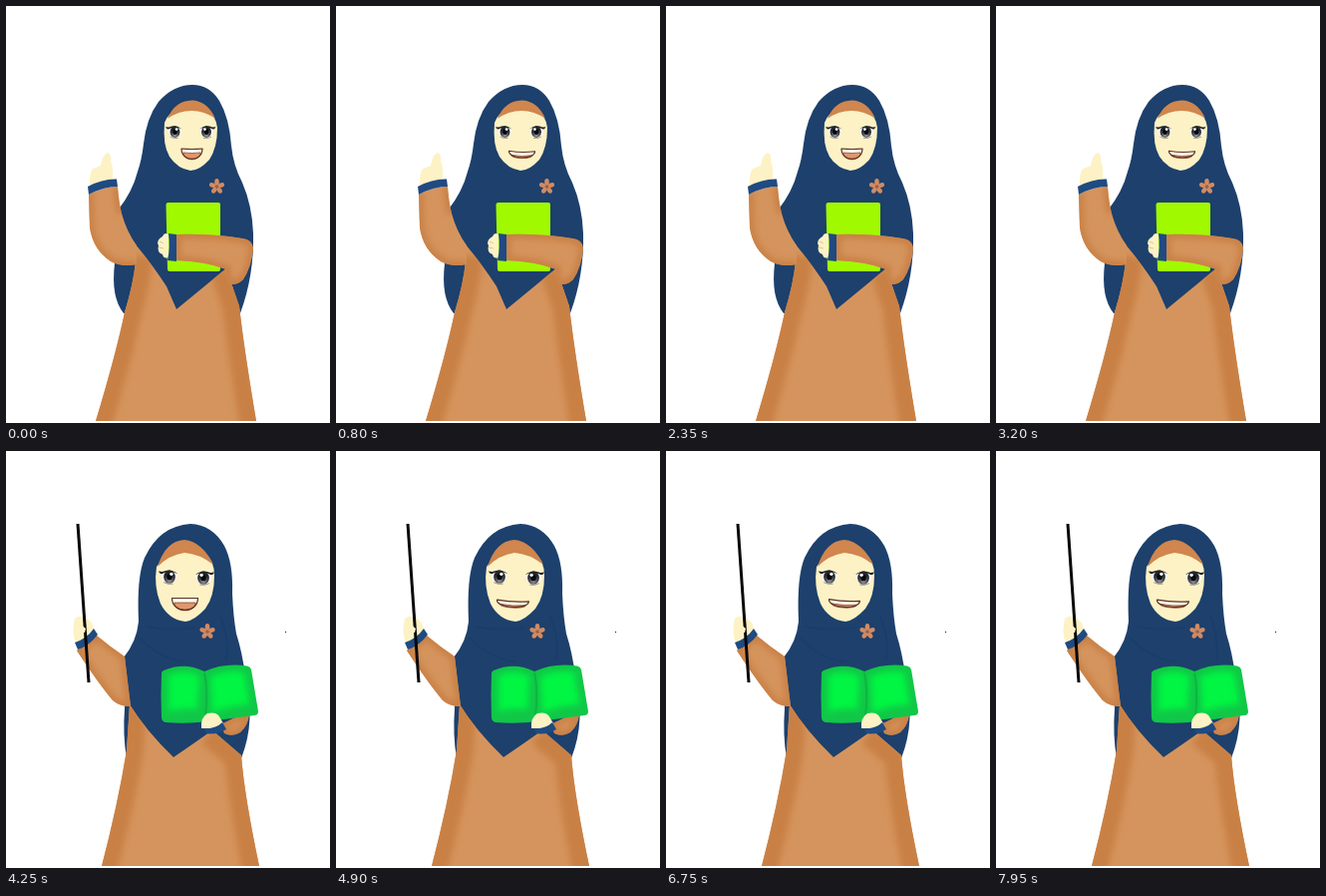
These frames come from a looping animation (325 by 418 pixels, 8000 ms). An HTML page:

```html
<!DOCTYPE html>
<html lang="en">
<head>
<meta charset="utf-8">
<title>Teacher</title>
<style>
  html, body { margin: 0; width: 100%; height: 100%; overflow: hidden; background: #fff; }
  svg { display: block; width: 100%; height: 100%; }
  .veil { fill: #1d406c; }
  .cuff { fill: #1f4a82; }
  .skin { fill: #fdf2c5; }
  .cloth { fill: #d5945d; }
  .shade { fill: none; stroke: #c98044; stroke-width: 9; filter: url(#soft); }
  .side { stroke-width: 34; }
  .fold { fill: none; stroke: #173a6a; stroke-width: 1.5; opacity: .5; }
  .cap { fill: #d0864e; }
</style>
</head>
<body>
<svg viewBox="0 0 325 418" preserveAspectRatio="none">
  <defs>
    <filter id="soft" x="-40%" y="-40%" width="180%" height="180%"><feGaussianBlur stdDeviation="3"/></filter>
    <radialGradient id="iris" cy=".75">
      <stop offset="0" stop-color="#9fa1a8"/><stop offset=".55" stop-color="#555862"/><stop offset="1" stop-color="#24262d"/>
    </radialGradient>
    <g id="eye">
      <path d="M-7-2Q0-8 7-3Q7 5 1 6.5Q-5 6-7-2" fill="#fff"/>
      <ellipse cy=".2" rx="4.9" ry="5.9" fill="url(#iris)"/>
      <ellipse rx="2.4" ry="3" fill="#08090c"/>
      <circle cx="-1.6" cy="-2.4" r="1.4" fill="#fff"/>
      <path d="M-7-2.5Q-1-8 6-4.5L9.5-4.8L8-2.8L6.5-2.5Q0-6.5-7-2.5" fill="#222226"/>
      <path d="M-3 6.4Q1 7.4 5 5" fill="none" stroke="#776f66" stroke-width=".6"/>
    </g>
    <g id="flower" fill="#d18a62">
      <g id="petal"><ellipse cy="-4.5" rx="2.3" ry="3.4"/></g>
      <use href="#petal" transform="rotate(72)"/><use href="#petal" transform="rotate(144)"/>
      <use href="#petal" transform="rotate(216)"/><use href="#petal" transform="rotate(288)"/>
      <circle r="1.6" fill="#a6603e"/>
    </g>

    <path id="dressA" d="M122 231L130 239Q148 261 161 281L171 304L221 263L234 301Q239 345 251 416H90Q110 350 119 307Q128 278 130 255Z"/>
    <path id="raisedA" d="M83 189Q98 181 112 181Q113 196 116 208Q121 226 131 240L131 259Q116 262 105 256Q87 244 84 222Z"/>
    <path id="foldedA" d="M171 229Q205 228 237 233Q247 234 248 243Q246 262 238 274Q231 281 224 278Q219 272 221 264Q200 256 171 255Z"/>
    <path id="dressB" d="M124 254Q140 280 168 307Q190 292 207 280L236 305Q239 345 254 416H96Q112 355 121 300Z"/>
    <path id="raisedB" d="M71 200L91 185Q104 196 119 206L125 256Q114 256 107 250Q92 232 71 200Z"/>
    <path id="foldedB" d="M216 274L236 264L244 263Q243 275 235 282Q227 287 219 283Z"/>
    <clipPath id="cDressA"><use href="#dressA"/></clipPath>
    <clipPath id="cRaisedA"><use href="#raisedA"/></clipPath>
    <clipPath id="cFoldedA"><use href="#foldedA"/></clipPath>
    <clipPath id="cDressB"><use href="#dressB"/></clipPath>
    <clipPath id="cRaisedB"><use href="#raisedB"/></clipPath>
    <clipPath id="cFoldedB"><use href="#foldedB"/></clipPath>
  </defs>

  <g id="sceneA">
    <path class="veil" d="M187 79Q204 79 214 95Q224 112 226 140Q228 160 237 177Q247 200 248 228Q249 270 235 308H118Q105 292 109 258L112 205Q127 186 132 166Q136 155 138 138Q141 112 153 96Q168 79 187 79Z"/>
    <use href="#dressA" class="cloth"/>
    <g clip-path="url(#cDressA)"><path class="shade side" d="M130 250Q128 278 119 307Q110 350 84 436M221 263L234 301Q239 345 254 436"/></g>
    <use href="#raisedA" class="cloth"/>
    <g clip-path="url(#cRaisedA)"><path class="shade" d="M112 181Q113 196 116 208M83 186L84 222Q87 244 105 256Q116 262 131 259"/></g>
    <path class="skin" d="M84 181Q83 168 87 163L95 160Q97 148 102 147Q106 148 105 155Q109 166 106 176L98 181Z"/>
    <path class="cuff" d="M82 181Q97 173 111 173.5L112 181Q98 181 83 189Z"/>
    <path d="M163 197H213Q215 197 215 199V264Q215 266 213 266H164Q162 266 162 264L160.500 199Q160.500 197 163 197Z" fill="#a1f900"/>
    <use href="#foldedA" class="cloth"/>
    <g clip-path="url(#cFoldedA)"><use href="#foldedA" class="shade"/></g>
    <path class="skin" d="M163 229Q159 226 157 231Q150 235 153 240Q151 247 157 249Q158 254 163 252Z"/>
    <path d="M154 236L158 238M153 242L158 243" stroke="#ddc797" fill="none"/>
    <path class="cuff" d="M163 228L171 229V256L162 255Q165 242 163 228Z"/>
    <path class="skin" d="M159 117Q163 106 174 103Q187 98 200 103Q210 108 212 122Q212 142 204 154Q194 165 185 165Q172 163 164 151Q157 139 159 117Z"/>
    <path class="cap" d="M162 113Q169 95 187 94.500Q203 96 210 113Q199 105 186 105Q173 105 162 113Z"/>
    <use href="#flower" transform="translate(211.500 181)"/>
    <g class="eyes" data-y="126">
      <use href="#eye" transform="translate(169.500 126) scale(-1 1)"/><use href="#eye" transform="translate(201 126)"/>
    </g>
    <g class="mouth"></g>
  </g>

  <g id="sceneB">
    <path class="veil" d="M185 73Q207 74 219 95Q228 112 227 143Q228 166 231 183Q237 202 240 225Q251 270 236 308H121Q117 285 119 258L118 207Q131 191 133 171Q131 126 139 107Q154 75 185 73Z"/>
    <path class="fold" d="M140 176Q165 181 190 177M134 187Q155 209 180 211M215 165Q224 187 221 210"/>
    <use href="#dressB" class="cloth"/>
    <g clip-path="url(#cDressB)"><path class="shade side" d="M124 254L121 300Q112 355 90 436M207 280L236 305Q239 345 257 436"/></g>
    <use href="#raisedB" class="cloth"/>
    <g clip-path="url(#cRaisedB)"><use href="#raisedB" class="shade"/></g>
    <path class="skin" d="M69 190Q66 180 69 168Q74 164 79 167Q87 170 88 179L84 187L74 193Z"/>
    <path class="cuff" d="M69 192Q81 188 88 178L92 184Q84 195 72 199Z"/>
    <path d="M72 73L83 232" stroke="#080808" stroke-width="3"/>
    <path class="skin" d="M68 176Q73 171 80 178L79 182Q72 181 68 182Z"/>
    <use href="#foldedB" class="cloth"/>
    <g clip-path="url(#cFoldedB)"><use href="#foldedB" class="shade"/></g>
    <path d="M158 220Q179 211 199 221Q219 212 242 215.500Q245 216 246 219L253 261Q253 265 249 265L203 271Q180 274 160 272Q156 271 156 267Q155 245 156 223Q156 221 158 220Z" fill="#10c747"/>
    <g filter="url(#soft)" fill="#00f642">
      <path d="M163 225Q181 218 194 226L192 259Q177 257 163 261Z"/>
      <path d="M205 226Q222 219 239 222L244 254Q225 255 207 262Z"/>
    </g>
    <path d="M199 222Q203 240 200 266" fill="none" stroke="#0bae3d" stroke-width="2" opacity=".7"/>
    <path class="skin" d="M196 278Q195 267 202 263Q212 261 215 268L218 273L211 278Z"/>
    <path class="cuff" d="M198 278Q210 279 217 272L221 279Q211 285 201 283Z"/>
    <path class="skin" d="M151 116Q157 106 170 101Q185 96 199 102Q209 109 209 125Q209 146 200 158Q189 170 180 171Q163 169 155 153Q148 136 151 116Z"/>
    <path class="cap" d="M152 116Q160 90 179 89Q197 91 208 114Q194 103 179 102Q164 104 152 116Z"/>
    <use href="#flower" transform="translate(202 181)"/>
    <g class="eyes" data-y="127">
      <use href="#eye" transform="translate(164 126) scale(-1.18 1.12)"/><use href="#eye" transform="translate(198 127) scale(1.18 1.12)"/>
    </g>
    <g class="mouth"></g>
    <circle cx="280.5" cy="181.5" r=".7" fill="#333"/>
  </g>
</svg>
<script>
const LOOP = 8000, CUT = 3900, BEAT = 100;
const SPEECH = 'DDSWWSDDSWWSDDSWWSDDSWWDDSSWDDWSSDDSWWSDWSDDOOSWWSDDOSWWOODSSOODSSWWSOODSSWWDDSS';
const BLINKS = [1725, 5125, 7250];

// x, y, half width, top sag, height, teeth depth, tilt
const MOUTHS = {
  sceneA: { D: [186.5, 143, 10.5, 1, 10.5, 4, 0], W: [185, 145.5, 15.5, 2, 7, 4, 0], S: [186.5, 145.5, 13, 2, 6.5, 4, 1] },
  sceneB: { D: [179.5, 147.5, 13, 0, 12, 4.5, 0], W: [179, 149.5, 15.5, 2, 7, 4, 3],
            S: [177.5, 150, 16, 2, 6.5, 4, 3], O: [178.5, 151, 9.5, -13, 8, -3, 2] }
};

const lips = (w, top, sag, h) =>
  `M${-w} ${top}Q0 ${top + sag} ${w} ${top}C${w} ${h * 1.33} ${-w} ${h * 1.33} ${-w} ${top}Z`;

function mouth([x, y, w, sag, h, teeth, tilt]) {
  const inner = teeth < 0
    ? `<path d="${lips(w * .85, 1.5, -8, h * .9)}" fill="#f5786a"/>`
    : `<path d="${lips(w * .82, teeth, sag, h * .94)}" fill="#e0966c" stroke="#74382a" stroke-width=".7"/>`;
  return `<g transform="translate(${x} ${y}) rotate(${tilt})" stroke-linejoin="round">
    <path d="${lips(w, 0, sag, h)}" fill="${teeth < 0 ? '#7c2c27' : '#fffdf0'}"/>${inner}
    <path d="${lips(w, 0, sag, h)}" fill="none" stroke="#5c3022" stroke-width="1.2"/></g>`;
}

const scenes = Object.keys(MOUTHS).map(id => {
  const node = document.getElementById(id);
  return { id, node, eyes: node.querySelector('.eyes'), mouth: node.querySelector('.mouth'), shape: '' };
});

function draw(now) {
  const t = now % LOOP;
  const current = scenes[t < CUT ? 0 : 1];
  scenes.forEach(s => s.node.style.display = s === current ? '' : 'none');

  const shape = SPEECH[Math.floor(t / BEAT)];
  if (shape !== current.shape) {
    current.mouth.innerHTML = mouth(MOUTHS[current.id][shape]);
    current.shape = shape;
  }

  const nearest = Math.min(...BLINKS.map(b => Math.abs(t - b)));
  const open = Math.min(1, Math.max(.12, (nearest - 25) / 75));
  const y = current.eyes.dataset.y;
  current.eyes.setAttribute('transform', `translate(0 ${y * (1 - open)}) scale(1 ${open})`);
}

const start = performance.now();
function tick() {
  draw(performance.now() - start);
  requestAnimationFrame(tick);
}
tick();
</script>
</body>
</html>
```
